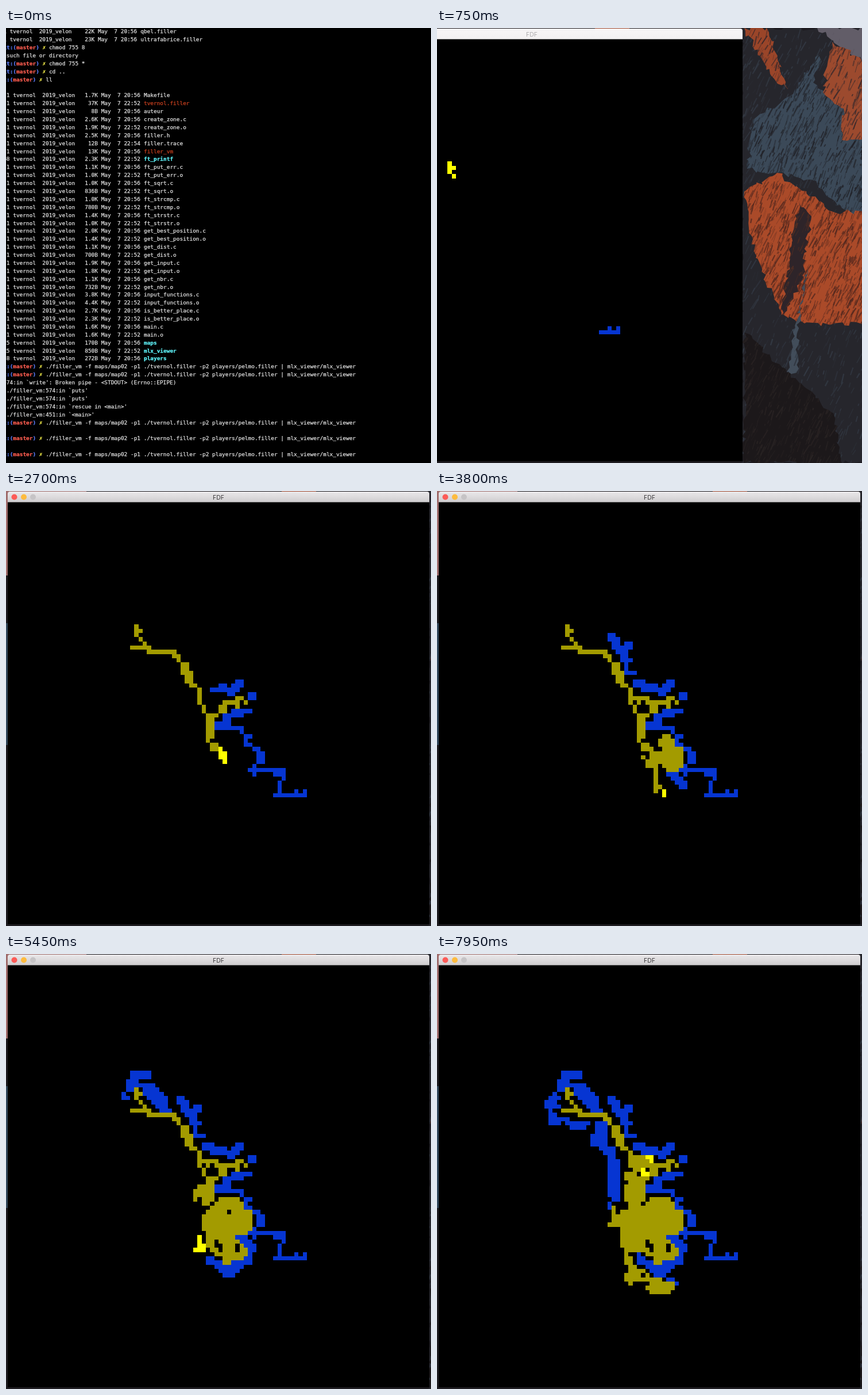
An HTML page with a canvas for the animation above (8 s loop, 740x757 px).

```html
<!DOCTYPE html>
<html lang="en">
<head>
<meta charset="utf-8">
<title>Filler viewer</title>
<style>
html, body { margin: 0; width: 100%; height: 100%; overflow: hidden; background: #000; }
canvas { display: block; }
</style>
</head>
<body>
<canvas id="stage" width="740" height="757"></canvas>
<script>
const W = 740, H = 757, LOOP = 8000, STEP = 50;
const ctx = document.getElementById('stage').getContext('2d');

function layer(w, h, paint) {
  const c = document.createElement('canvas');
  c.width = w;
  c.height = h;
  paint(c.getContext('2d'));
  return c;
}

function seeded(seed) {
  return () => (seed = (seed * 16807) % 2147483647) / 2147483647;
}

// ---------- terminal ----------
const ADV = 5.69, PITCH = 13.88, LEFT = 20;
const INK = '#e2e2e2', CYAN = '#5ff5fb', RED = '#ff5d50', EXEC = '#c9401f',
      BLUE = '#5b7dfa', GREEN = '#54cf5c', YELLOW = '#fdf64c';
const USER = 'tvernol', GROUP = '2019_velon';

const run = (col, text, color = INK, bold = false) => ({ col, text, color, bold });

function prompt(dir, cmd, arrow = GREEN) {
  const git = 4 + dir.length;
  return [
    run(0, '➜', arrow, true), run(3, dir, CYAN, true),
    run(git, 'git:(', BLUE, true), run(git + 5, 'master', RED, true),
    run(git + 11, ')', BLUE, true), run(git + 13, '✗', YELLOW, true),
    run(git + 15, cmd)
  ];
}

function entry(name, size, time = '20:56', kind = '', links = 1, pad = 3) {
  const perm = kind === 'dir' ? 'drwxr-xr-x' : kind === 'exec' ? '-rwxr-xr-x' : '-rw-r--r--';
  const head = `${perm} ${String(links).padStart(pad)} ${USER}  ${GROUP}  ${size.padStart(5)} May  7 ${time} `;
  const color = kind === 'dir' ? CYAN : kind === 'exec' ? EXEC : INK;
  return [run(0, head), run(head.length, name, color, kind === 'dir')];
}

// a source file and its object file
const pair = (name, c, o) => [entry(name + '.c', c), entry(name + '.o', o, '22:52')];
const play = (rival, arrow) => prompt('filler',
  `./filler_vm -f maps/map02 -p1 ./${USER}.filler -p2 players/${rival}.filler | mlx_viewer/mlx_viewer`, arrow);
const plain = text => [run(0, text)];
const from = text => plain('        from ./filler_vm:' + text);

const lines = [
  entry('qbel.filler', '22K', '20:56', '', 1, 2),
  entry('ultrafabrice.filler', '23K', '20:56', '', 1, 2),
  prompt('players', 'chmod 755 8'),
  plain('chmod: 8: No such file or directory'),
  prompt('players', 'chmod 755 *', RED),
  prompt('players', 'cd ..'),
  prompt('filler', 'll'),
  plain('total 344'),
  entry('Makefile', '1.7K'),
  entry(USER + '.filler', '37K', '22:52', 'exec'),
  entry('auteur', '8B'),
  ...pair('create_zone', '2.6K', '1.9K'),
  entry('filler.h', '2.5K'),
  entry('filler.trace', '12B', '22:54'),
  entry('filler_vm', '13K', '20:56', 'exec'),
  entry('ft_printf', '2.3K', '22:52', 'dir', 68),
  ...pair('ft_put_err', '1.1K', '1.0K'),
  ...pair('ft_sqrt', '1.0K', '836B'),
  ...pair('ft_strcmp', '1.0K', '780B'),
  ...pair('ft_strstr', '1.4K', '1.0K'),
  ...pair('get_best_position', '2.0K', '1.4K'),
  ...pair('get_dist', '1.1K', '700B'),
  ...pair('get_input', '1.9K', '1.8K'),
  ...pair('get_nbr', '1.1K', '732B'),
  ...pair('input_functions', '3.8K', '4.4K'),
  ...pair('is_better_place', '2.7K', '2.3K'),
  ...pair('main', '1.6K', '1.6K'),
  entry('maps', '170B', '20:56', 'dir', 5),
  entry('mlx_viewer', '850B', '22:52', 'dir', 25),
  entry('players', '272B', '20:56', 'dir', 8),
  play('pelmo'),
  play('pelmo'),
  plain("./filler_vm:574:in `write': Broken pipe - <STDOUT> (Errno::EPIPE)"),
  from("574:in `puts'"),
  from("574:in `puts'"),
  from("574:in `rescue in <main>'"),
  from("451:in `<main>'"),
  play('pelmo'), plain('^C'),
  play('pelmo', RED), plain('^C'),
  play('pelmo', RED), plain('^C'),
  play('ultrafabrice', RED)
];

const terminal = layer(900, 790, g => {
  g.lineWidth = 0.25;
  lines.forEach((line, i) => line.forEach(({ col, text, color, bold }) => {
    const x = LEFT + col * ADV, y = Math.round(9.4 + i * PITCH);
    g.font = `${bold ? 'bold ' : ''}9.45px "DejaVu Sans Mono", monospace`;
    g.fillStyle = g.strokeStyle = color;
    g.fillText(text, x, y);
    g.strokeText(text, x, y);
  }));
});

function drawTerminal(t, x) {
  ctx.drawImage(terminal, Math.round(x), t < 400 ? 0 : -Math.round(PITCH));
}

// ---------- wallpaper ----------
const EDGE = 75, DESK_W = 1150, ROCK_X = 280;
const wallpaper = layer(DESK_W, H, g => {
  const rnd = seeded(42);
  const rect = (color, x, y, w, h) => { g.fillStyle = color; g.fillRect(x, y, w, h); };

  // jagged outline through a few corners, streaked inside
  function rock(color, streak, density, ...pts) {
    const corners = [];
    for (let i = 0; i < pts.length; i += 2) corners.push([pts[i], pts[i + 1]]);
    g.save();
    g.beginPath();
    corners.forEach(([x, y], i) => {
      const [nx, ny] = corners[(i + 1) % corners.length];
      const n = Math.ceil(Math.hypot(nx - x, ny - y) / 7);
      for (let k = 0; k < n; k++) {
        const jag = k && 9;
        g.lineTo(x + (nx - x) * k / n + (rnd() - 0.5) * jag, y + (ny - y) * k / n + (rnd() - 0.5) * jag);
      }
    });
    g.fillStyle = color;
    g.fill();
    g.clip();
    g.strokeStyle = streak;
    const xs = corners.map(p => p[0]), ys = corners.map(p => p[1]);
    const x0 = Math.min(...xs), y0 = Math.min(...ys);
    const w = Math.max(...xs) - x0, h = Math.max(...ys) - y0;
    for (let i = 0; i < w * h * density; i++) {
      const x = x0 + rnd() * w, y = y0 + rnd() * h, len = 3 + rnd() * 16;
      g.lineWidth = 0.5 + rnd() * 2;
      g.globalAlpha = 0.3 + rnd() * 0.6;
      g.beginPath();
      g.moveTo(x, y);
      g.lineTo(x - len * (0.2 + rnd() * 0.5), y + len);
      g.stroke();
    }
    g.restore();
  }

  rect('#1d1b20', 0, 0, DESK_W, H);
  rect('#a06d6d', 0, 0, EDGE + 140, 147);
  rect('#33485c', 0, 230, EDGE + 10, 212);
  rect('#a04a30', EDGE + 480, 0, 60, 3);

  g.translate(ROCK_X, 0);
  rock('#26262c', '#343b46', 0.006, 530, 0, 870, 0, 870, 757, 530, 757);
  rock('#625d68', '#5c5763', 0.002, 662, 0, 870, 0, 870, 58, 740, 58, 690, 22);
  rock('#3b4958', '#222329', 0.018, 672, 35, 655, 95, 700, 130, 870, 130, 870, 320, 715, 325, 655, 265,
    540, 245, 550, 160, 620, 115);
  rock('#9a4529', '#35262a', 0.015, 535, 0, 574, 0, 612, 110, 580, 80);
  rock('#9c4a2e', '#3a2a2c', 0.016, 688, 24, 740, 58, 870, 90, 870, 195, 705, 195, 708, 140, 672, 112);
  rock('#aa4a29', '#54291f', 0.022, 535, 285, 592, 252, 690, 320, 870, 322, 870, 518, 640, 514, 600, 500, 555, 400);
  rock('#2e2429', '#593022', 0.01, 630, 300, 652, 328, 635, 440, 600, 505);
  rock('#424d5a', '#2c323b', 0.01, 645, 420, 632, 480, 626, 600, 608, 600);
  rock('#1c181a', '#2a2424', 0.012, 535, 530, 600, 590, 690, 670, 705, 757, 535, 757);
});

// ---------- board ----------
const CELL = 7.34, BX = 3, BY = 19.5, PIECE = 5;
const DIM = '#a39b00', HOT = '#ffff00', RIVAL = '#0635d2';
const dice = seeded(7);

// cells along key points; a thickness above one adds cells to the right and below
function trail(thick, ...pts) {
  const cells = [], brush = Math.ceil(thick);
  const keep = (thick - 1) / Math.max(1, brush - 1);
  for (let i = 2; i < pts.length; i += 2) {
    const [x, y, nx, ny] = pts.slice(i - 2, i + 2);
    const n = Math.max(Math.abs(nx - x), Math.abs(ny - y));
    for (let k = 0; k <= n; k++) {
      const c = Math.round(x + (nx - x) * k / n), r = Math.round(y + (ny - y) * k / n);
      for (let d = 0; d < brush * brush; d++) {
        if (!d || dice() < keep) cells.push([c + d % brush, r + Math.floor(d / brush)]);
      }
    }
  }
  return cells;
}

// cells inside an outline, nearest to its first corner first, with random holes
function area(holes, ...pts) {
  const path = new Path2D(), cells = [];
  for (let i = 0; i < pts.length; i += 2) path.lineTo(pts[i], pts[i + 1]);
  for (let r = 40; r < 80; r++) {
    for (let c = 35; c < 60; c++) {
      if (ctx.isPointInPath(path, c + 0.5, r + 0.5) && dice() >= holes) cells.push([c, r]);
    }
  }
  const far = ([c, r]) => Math.hypot(c - pts[0], r - pts[1]);
  return cells.sort((a, b) => far(a) - far(b));
}

const taken = new Set(), moves = [];

function claim(cells) {
  return cells.filter(cell => {
    const key = cell.join();
    return !taken.has(key) && taken.add(key);
  });
}

function split(cells) {
  const n = Math.max(1, Math.round(cells.length / PIECE));
  return Array.from({ length: n }, (_, i) =>
    cells.slice(Math.round(i * cells.length / n), Math.round((i + 1) * cells.length / n)));
}

// both sides lay their strokes piece by piece, evenly between two times
function round(begin, end, sides) {
  for (const side in sides) {
    const pieces = sides[side].flatMap(s => split(claim(s))).filter(p => p.length);
    pieces.forEach((cells, i) =>
      moves.push({ side, cells, at: begin + (end - begin) * (i + 1) / pieces.length }));
  }
}

round(0, 0, {
  yellow: [trail(1, 30, 29, 30, 30, 31, 30, 30, 31, 31, 32)],
  blue: [trail(1, 66, 69, 68, 69, 68, 68, 69, 69, 70, 69, 70, 68)]
});

// both run towards the middle
round(750, 2700, {
  yellow: [
    trail(1, 32, 33, 33, 34, 29, 34), trail(1.15, 33, 35, 39, 35, 41, 38), trail(1.9, 41, 38, 42, 41, 43, 42),
    trail(1.1, 45, 44, 45, 47, 47, 50), trail(1.3, 47, 50, 47, 55), trail(1.2, 48, 51, 51, 47, 55, 46),
    trail(1.5, 47, 55, 48, 58), trail(1, 50, 58, 50, 60, 51, 59, 51, 61)
  ],
  blue: [
    trail(1, 65, 69, 63, 69, 64, 69, 64, 66, 65, 65, 65, 63), trail(1.3, 64, 63, 57, 63, 59, 61),
    trail(1.2, 59, 61, 59, 58, 56, 57, 55, 53), trail(1, 55, 53, 53, 53), trail(2, 51, 52, 48, 52),
    trail(1.5, 51, 50, 54, 49), trail(1, 54, 49, 57, 49), trail(1.2, 56, 47, 57, 45),
    trail(1.6, 54, 42, 52, 44), trail(1.3, 51, 43, 48, 44)
  ]
});

// yellow drops below, blue climbs along the trunk
round(2700, 3800, {
  yellow: [
    trail(1.5, 48, 60, 50, 61), area(0.1, 52, 62, 52, 57, 53, 55, 56, 56, 58, 59, 58, 62, 57, 64, 55, 64),
    trail(1.2, 46, 46, 51, 47), trail(1, 51, 62, 51, 67), trail(1, 51, 68, 52, 67), trail(1, 53, 68, 53, 69)
  ],
  blue: [
    trail(1.9, 54, 63, 57, 66), trail(1.9, 50, 43, 46, 42), trail(1.2, 46, 40, 44, 40),
    trail(1.4, 44, 39, 43, 35, 44, 33), trail(1.9, 42, 34, 40, 31)
  ]
});

// yellow fills its pocket, blue wraps both ends
round(3800, 5450, {
  yellow: [
    area(0.16, 55, 70, 51, 71, 47, 66, 46, 60, 46, 56, 55, 55, 58, 59, 58, 63, 54, 64, 57, 68),
    area(0.05, 49, 51, 49, 55, 44, 56, 44, 53), trail(1, 45, 64, 45, 66, 46, 66, 46, 67, 44, 67)
  ],
  blue: [
    trail(1.9, 56, 66, 56, 69), trail(1.9, 54, 70, 50, 71), trail(1.5, 53, 72, 51, 72),
    trail(1.6, 49, 70, 47, 69), trail(2.5, 36, 32, 34, 30, 32, 28), trail(1.8, 31, 28, 28, 27),
    trail(1.5, 29, 27, 29, 25, 32, 25), trail(1.3, 28, 28, 27, 31)
  ]
});

// yellow widens to the left, blue follows the trunk down on its other side
round(5450, 6800, {
  yellow: [
    area(0.03, 49, 67, 46, 68, 43, 67, 43, 62, 40, 62, 42, 60, 44, 57, 50, 57),
    trail(1, 41, 57, 41, 59), area(0.1, 47, 57, 44, 57, 44, 49, 47, 49),
    trail(1.4, 44, 68, 45, 71, 44, 73), trail(1.3, 46, 72, 48, 72)
  ],
  blue: [
    trail(1.2, 26, 31, 26, 36), trail(1.4, 25, 32, 27, 32), trail(1.5, 26, 36, 35, 37),
    trail(3, 37, 37, 37, 39), trail(1.9, 36, 40, 36, 41), trail(1.9, 38, 42, 40, 43)
  ]
});

round(6800, 7950, {
  yellow: [
    trail(1.2, 44, 74, 52, 74), area(0, 49, 76, 52, 75, 56, 75, 56, 76, 54, 78, 50, 78),
    area(0.3, 49, 60, 50, 57, 54, 57, 54, 63), area(0.1, 45, 45, 51, 45, 52, 50, 46, 51),
    trail(1, 52, 47, 54, 47)
  ],
  blue: [
    trail(2.6, 40, 45, 40, 52), trail(1.3, 41, 53, 41, 55, 40, 56),
    trail(1, 47, 67, 47, 69), trail(1.2, 53, 73, 55, 74)
  ]
});

function drawPiece(cells, color) {
  const px = c => Math.round(BX + c * CELL), py = r => Math.round(BY + r * CELL);
  ctx.fillStyle = color;
  for (const [c, r] of cells) ctx.fillRect(px(c), py(r), px(c + 1) - px(c), py(r + 1) - py(r));
}

function drawBoard(t) {
  const done = moves.filter(m => m.at <= t);
  const latest = done.filter(m => m.side === 'yellow').pop();
  for (const m of done) drawPiece(m.cells, m.side === 'blue' ? RIVAL : m === latest ? HOT : DIM);
}

// ---------- window ----------
function dot(x, color) {
  ctx.fillStyle = color;
  ctx.beginPath();
  ctx.arc(x, 10.5, 5, 0, Math.PI * 2);
  ctx.fill();
}

function drawWindow(t) {
  const active = t >= 1000;
  ctx.fillStyle = '#000';
  ctx.fillRect(3, 5, 734, 749);

  const bar = ctx.createLinearGradient(0, 1, 0, 19);
  bar.addColorStop(0, active ? '#ebe9eb' : '#f8f6f7');
  bar.addColorStop(1, active ? '#cfcdcf' : '#f3f1f2');
  ctx.fillStyle = bar;
  ctx.beginPath();
  ctx.moveTo(3, 19.5);
  ctx.arcTo(3, 1, 370, 1, 4);
  ctx.arcTo(737, 1, 737, 19.5, 4);
  ctx.lineTo(737, 19.5);
  ctx.fill();

  dot(14.5, active ? '#fc5b57' : '#dcdadc');
  dot(31, active ? '#fdbb3f' : '#dcdadc');
  dot(47, active ? '#c6c4c6' : '#dcdadc');
  ctx.fillStyle = active ? '#3c3a3c' : '#aeacae';
  ctx.font = '10.5px Inter, sans-serif';
  ctx.textAlign = 'center';
  ctx.fillText('FDF', 370, 14.5);
  drawBoard(t);
}

// ---------- scene ----------
const TRAVEL = 1200;

// critically damped slide between the two desktops
function slide(t) {
  const x = Math.max(0, t - 575) * 0.0183;
  return TRAVEL * (1 - (1 + x) * Math.exp(-x));
}

function draw(t) {
  const shift = slide(t);
  ctx.fillStyle = '#000';
  ctx.fillRect(0, 0, W, H);
  if (shift < W + 100) drawTerminal(t, shift - 93.5);
  const desk = Math.round(shift - TRAVEL);
  if (desk + DESK_W - EDGE > 0) {
    ctx.save();
    ctx.translate(desk, 0);
    ctx.drawImage(wallpaper, -EDGE, 0);
    drawWindow(t);
    ctx.restore();
  }
}

// the picture changes in steps of 50 ms
const origin = performance.now();
function tick() {
  const t = (performance.now() - origin) % LOOP;
  draw(Math.floor(t / STEP) * STEP);
  requestAnimationFrame(tick);
}
tick();
</script>
</body>
</html>
```
